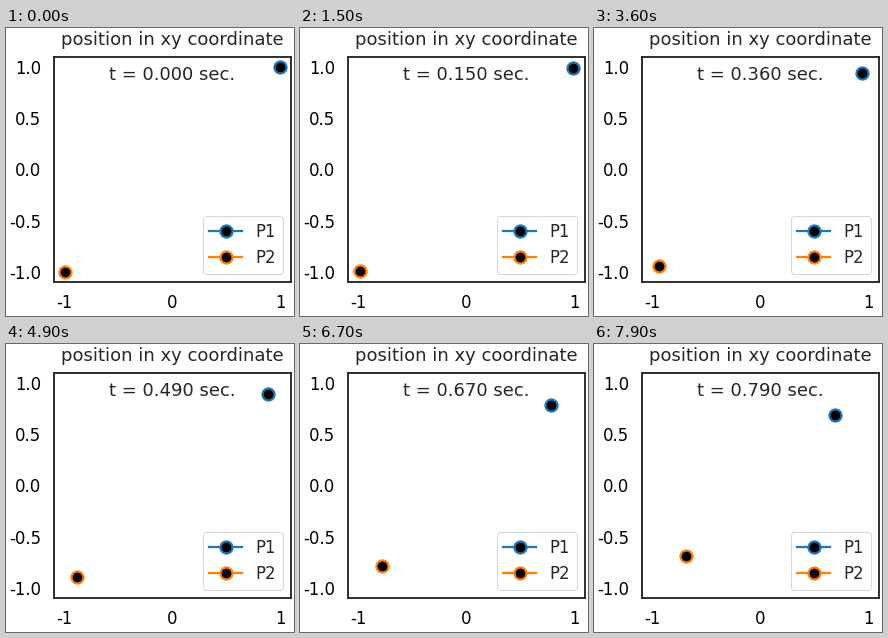
Write a matplotlib script that moves like this. It is 288 by 288 pixels and loops after 8000 ms.

```python
import numpy as np
import matplotlib.pyplot as plt
from matplotlib.animation import FuncAnimation

INK = "0.15"
FRAMES, DT = 80, 0.01

plt.rcParams.update({
    "font.family": "DejaVu Sans",
    "font.size": 18,
    "text.color": INK,
    "axes.edgecolor": INK,
    "axes.linewidth": 1.875,
    "axes.titlesize": 18,
    "axes.titlepad": 12,
    "axes.unicode_minus": False,
    "xtick.labelsize": 16.5,
    "ytick.labelsize": 16.5,
    "legend.fontsize": 16.5,
})

# Two equal masses falling together from rest: x'' = -A / x**2, x(0) = 1.
# Closed form: x = cos(eta)**2, t = (eta + sin(2 eta) / 2) / sqrt(2 A).
A = 10 / (8 * np.sqrt(2))
ETA = np.linspace(0, 1.2, 4000)
TIME = (ETA + np.sin(2 * ETA) / 2) / np.sqrt(2 * A)


def position(t):
    return np.cos(np.interp(t, TIME, ETA)) ** 2


fig = plt.figure(figsize=(4, 4), dpi=72, facecolor="white")
ax = fig.add_axes([48 / 288, 34 / 288, 237 / 288, 225 / 288])
ax.set(xlim=(-1.1, 1.1), ylim=(-1.1, 1.1),
       xticks=[-1, 0, 1], yticks=[-1, -0.5, 0, 0.5, 1])
ax.set_xticklabels(["-1", "0", "1"])
ax.tick_params(length=0, pad=12.5)
ax.set_title("position in xy coordinate")


def body(color, label):
    return ax.plot([], [], "o-", color=color, lw=2.25, ms=12, mfc="black",
                   mec=color, mew=2.25, label=label)[0]


p1 = body("#1f77b4", "P1")
p2 = body("#ff7f0e", "P2")
clock = ax.text(0.5, 0.9, "", ha="center", transform=ax.transAxes)
ax.legend(loc="lower right")


def update(i):
    t = i * DT
    x = position(t)
    p1.set_data([x], [x])
    p2.set_data([-x], [-x])
    clock.set_text(f"t = {t:.3f} sec.")
    return p1, p2, clock


anim = FuncAnimation(fig, update, frames=FRAMES, interval=100,
                     repeat=True, repeat_delay=0)
plt.show()
```
